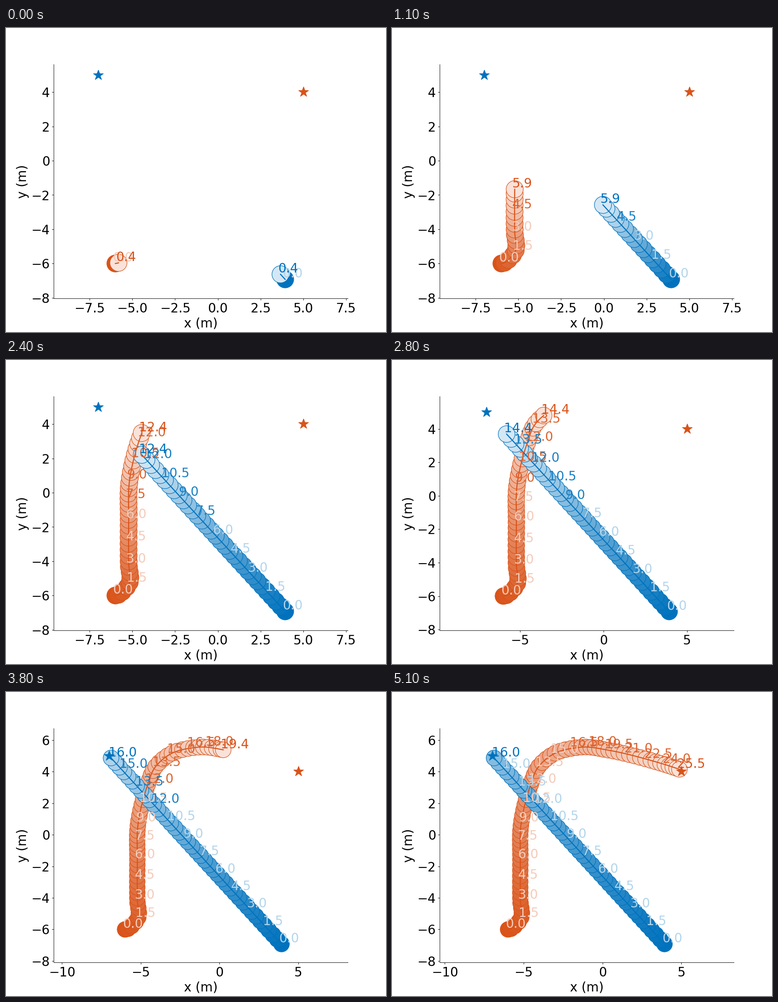
A matplotlib script for the animation above (6.1 s loop, 837 px wide and 669 px high).

```python
import numpy as np
import matplotlib.pyplot as plt
from matplotlib.animation import FuncAnimation
from matplotlib.patches import Circle

plt.rcParams["font.family"] = "DejaVu Sans"
plt.rcParams["font.size"] = 24

W, H, DPI = 837, 669, 83.7
FRAMES, INTERVAL = 61, 100
RADIUS = 0.5
CIRCLE_STEP, LABEL_STEP = 4, 15      # in tenths of a second
FADE = 1.2
ORANGE = np.array([0.85, 0.325, 0.098])
BLUE = np.array([0.0, 0.447, 0.741])


def straight_path(start, goal, steps):
    """Unit speed run towards the goal, first sample one step after the start."""
    start, goal = np.array(start, float), np.array(goal, float)
    heading = (goal - start) / np.linalg.norm(goal - start)
    return start + np.outer(0.1 * np.arange(1, steps + 2), heading)


def curved_path(waypoints, steps):
    """Cubic Hermite curve through (time, x, y) waypoints."""
    pts = np.array(waypoints)
    kt, kp = pts[:, 0], pts[:, 1:]
    slope = np.gradient(kp, kt, axis=0)
    t = 0.1 * np.arange(steps + 1)
    i = np.clip(np.searchsorted(kt, t, side="right") - 1, 0, len(kt) - 2)
    h = (kt[i + 1] - kt[i])[:, None]
    s = (t - kt[i])[:, None] / h
    return ((1 + 2 * s) * (1 - s) ** 2 * kp[i]
            + s * (1 - s) ** 2 * h * slope[i]
            + s * s * (3 - 2 * s) * kp[i + 1]
            + s * s * (s - 1) * h * slope[i + 1])


# sidestep, climb, turn behind the other robot, head for the goal
WAYPOINTS = [
    (0.0, -5.99, -6.00), (0.4, -5.81, -5.96), (1.5, -5.18, -5.30),
    (3.0, -5.21, -4.17), (6.0, -5.21, -1.58), (9.0, -5.16, 0.73),
    (12.0, -4.55, 3.19), (13.5, -4.10, 4.26), (15.0, -3.16, 5.09),
    (17.2, -1.33, 5.55), (19.5, 0.31, 5.37), (24.0, 3.96, 4.45),
    (25.5, 4.88, 4.15),
]

ROBOTS = [
    (curved_path(WAYPOINTS, 255), (5, 4), ORANGE),
    (straight_path((4, -7), (-7, 5), 160), (-7, 5), BLUE),
]
LAST = max(len(path) for path, _, _ in ROBOTS) - 1

fig = plt.figure(figsize=((W + 0.01) / DPI, (H + 0.01) / DPI), dpi=DPI)
ax = fig.add_subplot()


def tint(color, alpha):
    return tuple(1 - alpha * (1 - color))


def add_circle(pos, color, alpha):
    ax.add_patch(Circle(pos, RADIUS, fc=tint(color, alpha), ec=tuple(color)))


def add_label(pos, step, color, alpha):
    ax.text(pos[0] - 0.15, pos[1] + 0.1, f"{step / 10:.1f}",
            color=tint(color, alpha))


def draw_robot(path, goal, color, now):
    end = min(now, len(path) - 1)
    span = FADE * now
    ax.plot(*path[:end + 1].T, color=color, lw=2)
    ax.plot(*goal, color=color, marker="*", markersize=20)
    for k in range(0, end, CIRCLE_STEP):
        add_circle(path[k], color, 1 - k / span)
    for k in range(0, end, LABEL_STEP):
        add_label(path[k], k, color, 0.3 if k / span < 0.5 else 0.9)
    add_circle(path[end], color, 1 - end / span)
    add_label(path[end], end, color, 1)


def update(frame):
    now = min(4 + 5 * frame, LAST)
    ax.clear()
    for path, goal, color in ROBOTS:
        draw_robot(path, goal, color, now)
    ax.axis("equal")
    ax.set_xlabel("x (m)")
    ax.set_ylabel("y (m)")
    ax.spines[["top", "right"]].set_visible(False)


anim = FuncAnimation(fig, update, frames=FRAMES, interval=INTERVAL,
                     init_func=lambda: None, repeat=True, repeat_delay=0)
plt.show()
```
